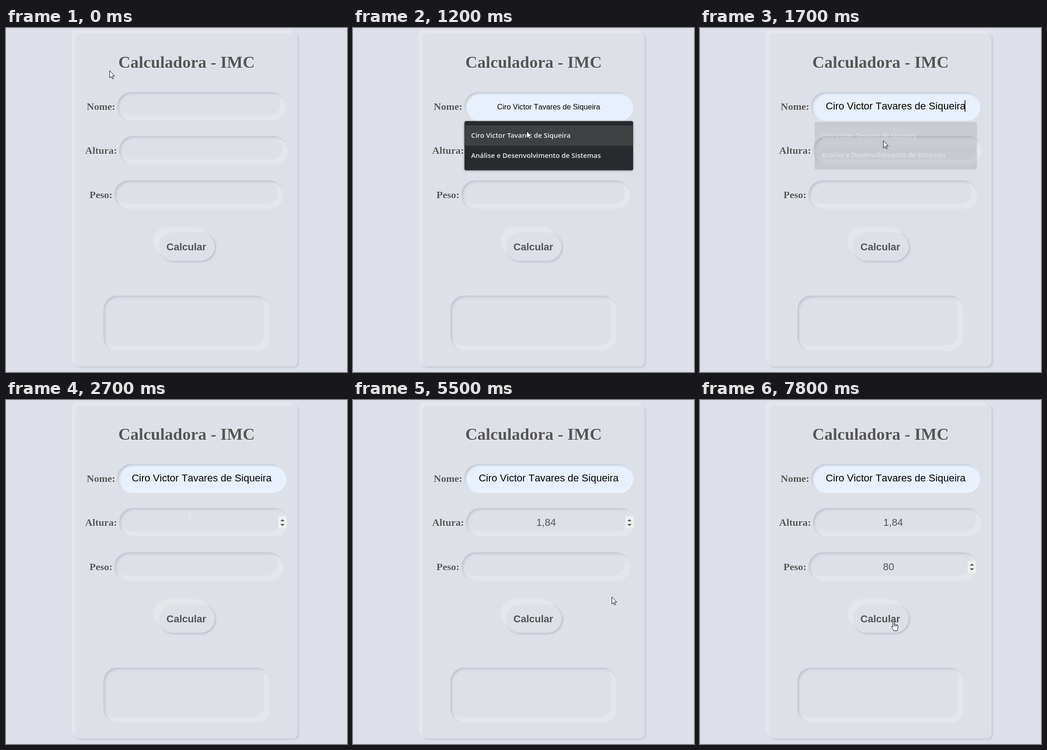
Recreate the animation shown at these times as an HTML page. Size 745 by 752 pixels, loop 8000 ms.

```html
<!DOCTYPE html>
<html lang="pt-BR">
<head>
<meta charset="utf-8">
<title>Calculadora - IMC</title>
<style>
  html, body { margin: 0; width: 100%; height: 100%; overflow: hidden; background: #dde0e8; }
  #stage { position: relative; width: 745px; height: 752px; overflow: hidden; }
  #stage > * { position: absolute; box-sizing: border-box; }
  svg { left: 0; top: 0; }
  .card { left: 152px; top: 12px; width: 485px; height: 728px; border-radius: 10px; background: #dde0e7;
    box-shadow: -8.5px -8px 1px #e4e6eb, 2px 2px 4px #c1c4ce; }
  .field { width: 369px; height: 63px; border-radius: 31px; background: #dde0e7;
    box-shadow: inset 3px 3px 5px #c1c4cf, inset -6px -6px 1px 6px #e4e6ea; }
  .field.filled { background: #e8f0fe;
    box-shadow: inset 3px 3px 5px #c1c4cf, inset -2px -2px 3px #f0f4fc; }
  #result { left: 213px; top: 585px; width: 363px; height: 121px; border-radius: 30px; }
  .button { left: 334px; top: 447px; width: 122px; height: 62px; border-radius: 31px; background: #dde0e7;
    box-shadow: -12px -12px 1px #e4e6ea, 2px 2px 4px #b9bcc8; }
  .serif { font: bold 22px "Liberation Serif", "Times New Roman", serif; fill: #555; text-shadow: 1px 1px 2px #f3f4f7; }
  .title { font-size: 36.5px; }
  .sans { font: 22px "Liberation Sans", Arial, sans-serif; fill: #555; }
  .mid { text-anchor: middle; }
  .bold { font-weight: bold; }
  #name { fill: #000; font-kerning: none; }
  #menu { transform-origin: 427.5px 257px; filter: drop-shadow(0 1px 2px rgba(0, 0, 0, .4)); }
  #menu text { font: 600 14.9px "Open Sans", "Noto Sans", sans-serif; fill: #e8eaed; }
</style>
</head>
<body>
<div id="stage">
  <div class="card"></div>
  <div class="field" id="nameBox" style="left:243px;top:140px"></div>
  <div class="field" style="left:247px;top:236px"></div>
  <div class="field" style="left:237px;top:333px"></div>
  <div class="button"></div>
  <div class="field" id="result"></div>
  <svg width="745" height="752">
    <defs>
      <g id="spin">
        <rect width="18" height="25" fill="#f0f0f0"/>
        <path d="M4.5 10L9 5.5L13.5 10ZM4.5 16L9 20.5L13.5 16Z" fill="#505050"/>
      </g>
    </defs>
    <text class="serif title mid" x="394.5" y="87">Calculadora - IMC</text>
    <text class="serif" x="176.5" y="179">Nome:</text>
    <text class="serif" x="173" y="275">Altura:</text>
    <text class="serif" x="182.5" y="372">Peso:</text>
    <text class="sans bold mid" x="394" y="486">Calcular</text>
    <text class="sans mid" id="name" x="427.5" y="178"></text>
    <text class="sans mid" id="height" x="422" y="275"></text>
    <text class="sans mid" id="weight" x="412" y="372"></text>
    <use href="#spin" id="heightSpin" x="595" y="255"/>
    <use href="#spin" id="weightSpin" x="585" y="352"/>
    <rect id="caret" width="2" height="25" fill="#333"/>
    <g id="menu">
      <rect x="243.5" y="203.5" width="368.5" height="107.5" rx="4" fill="#292a2d"/>
      <rect id="hover" x="243.5" y="213" width="368.5" height="44" fill="#3f4042"/>
      <text id="option" x="258" y="240"></text>
      <text x="258" y="284">Análise e Desenvolvimento de Sistemas</text>
    </g>
    <g id="cursor">
      <path id="arrow" d="M.5 .5V16L4 12.7L6.4 18.2L8.8 17.2L6.4 11.8H11.3Z" fill="#fff" stroke="#000"/>
      <path id="beam" d="M-3.5 -7.5H-1L0 -6.5L1 -7.5H3.5M0 -6.5V6.5M-3.5 7.5H-1L0 6.5L1 7.5H3.5" fill="none" stroke="#f3f4f6"/>
      <path id="hand" d="M3.5 13V2.2C3.5 .2 6.5 .2 6.5 2.2V7.5C7 6.5 9.2 6.7 9.3 8.3C9.9 7.3 12 7.6 12 9.2C12.8 8.3 14.7 8.8 14.7 10.4V14.5C14.7 17 13 18.4 12.8 21.5H5.3C5 19 2.4 16.8 .9 13.8C-.2 11.7 1.2 10.5 3.5 13ZM6.5 7.5V12M9.3 8.3V12M12 9.2V12.5" fill="#fff" stroke="#000" stroke-linejoin="round"/>
    </g>
  </svg>
</div>
<script>
  const LOOP = 8000;
  const FULL_NAME = "Ciro Victor Tavares de Siqueira";
  const $ = id => document.getElementById(id);
  const show = (id, on) => { $(id).style.display = on ? "" : "none"; };

  // Rows start with the time in ms from which they hold.
  const pointer = [
    [0, "arrow", 226, 93], [100, "arrow", 268, 134], [300, "beam", 345, 164], [400, "beam", 363, 175],
    [1000, "arrow", 369, 198], [1100, "arrow", 375, 216], [1200, "arrow", 379, 225], [1300, "arrow", 385, 234],
    [1500, "arrow", 392, 241], [1600, "arrow", 397, 246], [1700, "arrow", 400, 246], [1800, "beam", 401, 251],
    [5200, "beam", 455, 305], [5300, "beam", 528, 378],
    [5500, "arrow", 565, 430], [5600, "arrow", 556, 418], [5700, "beam", 535, 384], [5800, "beam", 522, 370],
    [7400, "beam", 504, 382], [7500, "arrow", 474, 414], [7600, "arrow", 448, 440],
    [7700, "hand", 427, 476], [7800, "hand", 418, 483]
  ];
  const carets = [
    [0], [700, 427, 159], [1100], [1500, 578, 158], [2000],
    [2200, 422, 255], [2700], [3100, 428, 255], [3300, 431, 255], [3800],
    [4300, 431, 255], [4600, 437, 255], [4700, 443, 255], [5200],
    [5900, 412, 352], [6400], [6700, 418, 352], [6900, 424, 352], [7400]
  ];
  const menuFade = [[0, 0, 1], [700, 1, 1], [1500, .8, .99], [1600, .43, .97], [1700, .12, .96], [1800, 0, 1]];
  const heights = [[0, ""], [3100, "1"], [3300, "1,"], [4600, "1,8"], [4700, "1,84"]];
  const weights = [[0, ""], [6700, "8"], [6900, "80"]];

  const at = (rows, t) => rows.findLast(row => row[0] <= t).slice(1);

  function draw(t) {
    const [kind, x, y] = at(pointer, t);
    for (const id of ["arrow", "beam", "hand"]) show(id, id === kind);
    $("cursor").setAttribute("transform", `translate(${x} ${y})`);

    const [caretX, caretY] = at(carets, t);
    show("caret", caretX);
    if (caretX) {
      $("caret").setAttribute("x", caretX);
      $("caret").setAttribute("y", caretY);
    }

    const [alpha, scale] = at(menuFade, t);
    show("menu", alpha);
    $("menu").style.opacity = alpha;
    $("menu").style.transform = `scale(${scale})`;
    show("hover", t >= 1100);

    const filled = t >= 1100;
    $("nameBox").classList.toggle("filled", filled);
    $("name").textContent = filled ? FULL_NAME : "";
    $("name").style.fontSize = t < 1500 ? "16.2px" : "22px";
    $("height").textContent = at(heights, t)[0];
    $("weight").textContent = at(weights, t)[0];
    show("heightSpin", t >= 1800 && t < 5800);
    show("weightSpin", t >= 5800);
  }

  function tick() {
    draw(performance.now() % LOOP);
    requestAnimationFrame(tick);
  }
  $("option").textContent = FULL_NAME;
  tick();
</script>
</body>
</html>
```
